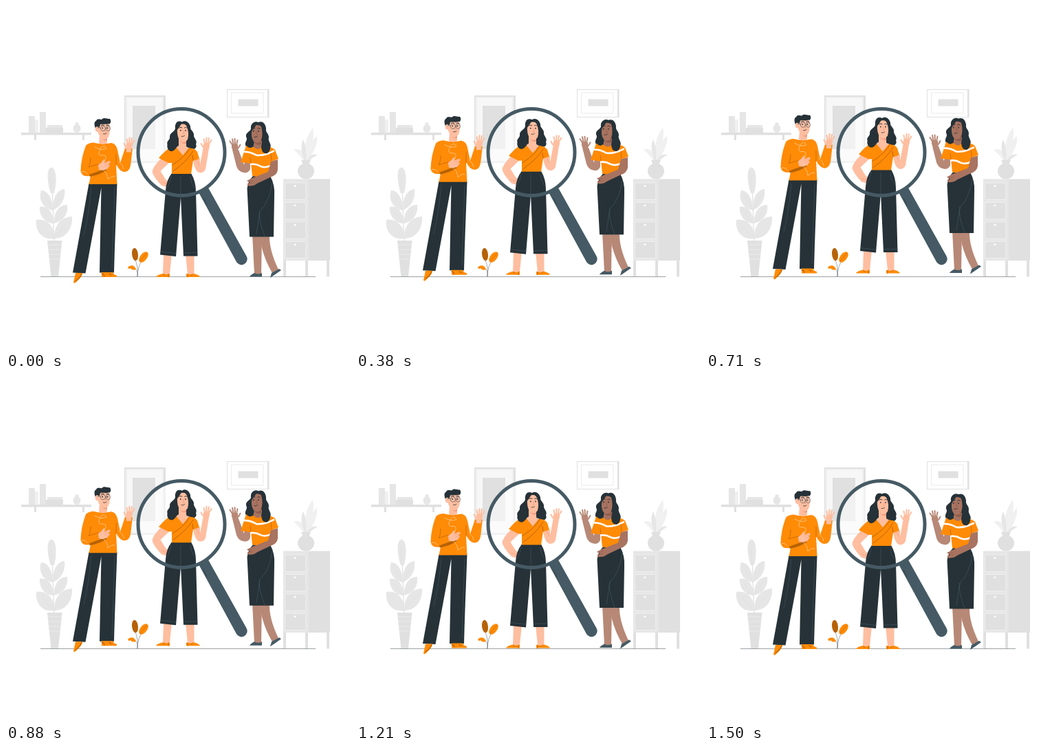
Recreate the animation shown at these times as an HTML page with a canvas. Size 500 px wide and 500 px high, loop 1540 ms.

```html
<!DOCTYPE html>
<html lang="en">
<head>
<meta charset="utf-8">
<title>Waving team</title>
<style>
  html, body { margin: 0; width: 100%; height: 100%; overflow: hidden; background: #fff; }
  canvas { display: block; width: 100vmin; height: 100vmin; }
</style>
</head>
<body>
<canvas id="stage"></canvas>
<script>
const LOOP = 1540, PEAK = 720, RISE = 5.4;
const ORANGE = '#ff8b07', RUST = '#b66206', DARK = '#263238', STEEL = '#455a64';
const PEACH = '#ffbea0', BLUSH = '#f39a7b', BROWN = '#b78876', TAN = '#a87360', UMBER = '#915e4e';
const G1 = '#f0f0f0', G2 = '#e6e6e6', G3 = '#e0e0e0';

const canvas = document.getElementById('stage');
const ctx = canvas.getContext('2d');
const scale = Math.max(1, window.devicePixelRatio || 1);
canvas.width = canvas.height = 500 * scale;

const paths = new Map();
function path(d) {
  if (!paths.has(d)) paths.set(d, new Path2D(d));
  return paths.get(d);
}
function fill(color, ...shapes) {
  ctx.fillStyle = color;
  shapes.forEach(d => ctx.fill(path(d)));
}
function line(color, width, ...shapes) {
  ctx.strokeStyle = color;
  ctx.lineWidth = width;
  shapes.forEach(d => ctx.stroke(path(d)));
}
function box(color, x, y, w, h) {
  ctx.fillStyle = color;
  ctx.fillRect(x, y, w, h);
}
function oval(color, x, y, rx, ry = rx, turn = 0) {
  ctx.fillStyle = color;
  ctx.beginPath();
  ctx.ellipse(x, y, rx, ry, turn, 0, Math.PI * 2);
  ctx.fill();
}

function drawShelf() {
  box(G3, 41, 187, 3, 8);
  box(G3, 111, 187, 3, 8);
  box(G3, 22, 184, 102, 3.5);
  box(G2, 33, 160, 9, 24);
  box(G1, 42, 165, 5, 19);
  box(G2, 49, 154, 9, 30);
  box(G2, 60, 173, 22, 5);
  box(G3, 58, 177, 25, 7);
  oval(G2, 103, 178, 5.5, 6);
  box(G2, 100.5, 169.5, 5, 5);
}

function drawPictures() {
  box(G3, 172, 130, 60, 98);
  box(G1, 173.5, 132, 55.5, 94);
  box('#f7f7f7', 176, 134, 51, 90);
  box(G3, 184, 145, 33, 63);
  box(G3, 321, 121, 61.5, 41);
  box('#fff', 322, 122, 58, 39);
  line(G2, .8, 'M328 126H374V156H328Z');
  box(G3, 337.5, 135.5, 29, 10);
}

function drawCabinet() {
  for (const x of [403, 435, 466]) box(G3, x, 368, 4, 25.5);
  box(G2, 403, 251.5, 37, 118.5);
  box(G3, 440, 251.5, 31, 118.5);
  for (let i = 0; i < 4; i++) {
    const y = 256.5 + i * 28.4;
    box(G1, 405, y, 30.5, 25.5);
    box(G3, 406, y + 1, 29, 23.5);
    oval('#fff', 420, y + 5, 1.6, 1.2);
  }
  fill(G1, 'M435 225C432 205 437 188 446 177C449 192 443 211 438 225Z',
    'M436 225C439 207 444 195 452 189C454 202 445 216 438 225Z',
    'M435 225C434 212 428 205 418 209C424 214 429 219 432 225Z');
  fill(G2, 'M434 225C429 212 428 201 432 194C436 203 437 214 436 225Z',
    'M437 225C441 217 447 214 453 216C448 219 443 222 440 226Z');
  oval(G3, 436, 240, 12, 11.5);
  fill(G3, 'M429 224H443L440 231H432Z');
}

function drawPottedPlant() {
  line(G3, 1.2, 'M67 248Q68 300 70 341');
  fill(G2, 'M66 234.500C58 236 60 258 65 272H70C74 258 74 236 66 234.500Z',
    'M68 297C53 294 47 281 51 268C61 268 68 280 68 297Z',
    'M68 297C67 280 74 267 85 266C87 280 80 292 68 297Z',
    'M69 316C56 316 48 304 49 292C61 289 69 301 69 316Z',
    'M69 316C70 299 77 289 89 289C91 303 82 314 69 316Z',
    'M70 338C53 341 42 327 44 311C60 308 71 321 70 338Z',
    'M70 338C69 320 80 306 96 306C97 324 87 338 70 338Z');
  line(G3, .6, 'M66 248V272M68 297L57 277M68 297L80 275M69 316L55 299M69 316L83 297M70 338L52 319M70 338L88 316');
  fill(G3, 'M60 341H81.500L76 393.500H65.500Z');
  line(G1, .7, 'M61 347H80M62 354H80M62.500 361H79M63 368H78');
}

function drawSprout() {
  line('#6b7378', .6, 'M191 393Q193 382 188 369M191 393Q191 378 198 370M191 393Q192 383 186 380');
  oval(RUST, 187.5, 361, 4.4, 9.3, -.12);
  oval(ORANGE, 200, 365, 5, 9, .66);
  fill(ORANGE, 'M177 380C180 376 187 376 189 383C186 384 183 384 181 381C180 383 178 382 177 380Z');
  line(RUST, .6, 'M194 372Q200 365 205 359');
}

// An open palm with four fingers and a thumb; `side` mirrors it.
function drawPalm(x, y, side, color) {
  ctx.save();
  ctx.translate(x, y);
  ctx.scale(side, 1);
  fill(color, 'M-4 1C-5 -3 -4.500 -7 -3 -8.500L4 -8.500C6 -5 5 -2 3 1L3 5H-4Z');
  line(color, 2, 'M-2 -7L-3.500 -14M0 -8L.500 -16M2.500 -8L4 -15.500M4 -7L7.500 -12.500M-3 -1Q-6.500 -4 -7.500 -7.500');
  ctx.restore();
}

function drawFace(x, y, ink, nose) {
  oval(ink, x - 3.2, y, .8, 1.1);
  oval(ink, x + 4, y, .8, 1.1);
  line(ink, .9, `M${x - 5} ${y - 4}q2 -1.500 4 0M${x + 2.500} ${y - 4}q2 -1.500 4 .500`);
  line(nose, .8, `M${x + .500} ${y}l1.500 4.500l-2 .500`);
  line(ink, .8, `M${x - 2} ${y + 8.500}q2.500 1 4.500 -1`);
}

function drawMan() {
  fill(DARK, 'M120.500 258H161.500C160 302 158 345 157 387.500H136L138.500 264L115.500 388.500L97 387.500Q109 322 120.500 258Z');
  line(STEEL, .5, 'M124 264Q121 300 113 334M158 264L154 380');
  fill(ORANGE, 'M101 388H111C111 394 104 399 100 403L98 402Z',
    'M139 387H155Q157 391 161 391.500V394H139Z');
  line(RUST, 1.2, 'M110 389Q108 395 101 400M139 389Q142 389 143 393M150 389L153 391');

  fill(ORANGE, 'M127 198.500Q140 202 153 199Q160 200 162 209L166 228L173 207H184L181 232Q179 242 171 241Q165 240 160 230L161.500 259H120.500L123 247Q110 249 108.500 240Q109 221 116 203Q119 199 127 198.500Z');
  fill(RUST, 'M121 245L143 237L147 238Q138 245 122 248Z');
  line(RUST, .7, 'M123 221Q123 230 120 234L134 230M160 216V231');
  line('#ffd5a5', .7, 'M129 205Q140 211 146 207Q143 201 138 206Q130 219 142 217Q148 218 143 226',
    'M141 238Q148 244 148 252Q155 246 158 248M110 241Q115 239 118 244M164 227Q170 231 171 237');
  fill(PEACH, 'M134 231Q139 228 142 223L144 224L143 228L150 225L152 227L149 230L151 232L147 237Q140 240 135 238Z');
  line(BLUSH, .6, 'M143 230L149 228M144 233L150 231');
  drawPalm(179, 207.5, 1, PEACH);

  fill(PEACH, 'M136 187H147V199Q142 203 135 199Z',
    'M133 171Q140 166 150 170Q152.500 182 149 190Q145 196 139 192Q133 187 133 177Z');
  fill(BLUSH, 'M139 192Q143 196 147 192V195Q143 197 139 192Z');
  fill(DARK, 'M133 183C128 176 127 168 131 167C132 163 138 165 139 165C143 161 147 165 151 164C154 168 151 173 149 171C145 173 140 171 137 172Q136 177 134 178Z');
  oval(PEACH, 132.5, 179, 2.8, 3.8);
  drawFace(143.5, 177.5, DARK, BLUSH);
  line(STEEL, .7, 'M137.500 178a3.500 3.700 0 1 0 7 0a3.500 3.700 0 1 0 -7 0M145.500 178a3 3.700 0 1 0 6 0a3 3.700 0 1 0 -6 0M137 177L133 177');
}

function drawCenterWoman() {
  fill(PEACH, 'M229 360H241L238 390H228Z', 'M261 360H273.500V390H264Z');
  fill(ORANGE, 'M228 389Q233 391 238 389V394H218Q219 391 228 389Z',
    'M262 389Q268 391 273 389Q281 391 282 394H262Z');
  line(RUST, .9, 'M229 390L231 392M236 390V394M271 390L269 392M264 390V394');

  fill(PEACH, 'M226 221L238 227L224.500 240L232 252L238 257L236 264L226 261Q214 248 212.500 241Q213 234 226 221Z',
    'M273 220L282 222L282 231L286.500 207H295L290 237Q287 244 280 242Q274 239 272 224Z');
  line(BLUSH, .7, 'M226 256L233 258M277 224L281 231');
  drawPalm(291, 207.5, 1, PEACH);
  fill(DARK, 'M241 243H269Q276 255 276 270L278.500 363.500H258L254 278L247 364L224 361.500L232 268Q233 253 241 243Z');
  line(STEEL, .6, 'M225 357L247 359.500M258 359L278 358.500M240 247Q239 256 235 263M268 248Q269 258 274 264M254 248V278');

  fill(DARK, 'M256 168.500C249 165 245 171 246 178C245 183 238 184 238 190C239 195 232 196 235 202C233 207 238 213 243 210L248 206H266C271 211 279 207 276 201C279 195 272 192 273 187C273 182 268 181 268 176C267 169 261 165 256 168.500Z');
  fill(PEACH, 'M251 193H262V204L268 208L258 222L244 207L251 203Z');
  fill(ORANGE, 'M247 205L257 217L266 206Q274 206 278 212L281 222L272 225L269 244H241V228L236 228L222 221Q232 209 240 205Z');
  line(RUST, .9, 'M267 207Q261 219 242 231M272 211Q262 227 243 240M271 217L272 224');
  fill(DARK, 'M247 180Q249 187 249 193Q252 202 246 208Q241 214 236 209Q232 202 238 194ZM266 180Q271 183 272 191Q279 200 274 206Q266 210 264 199Z');
  fill(PEACH, 'M249 177Q254 169 262 173Q267 184 264 194Q260 200 253 196Q248 190 249 177Z');
  fill(BLUSH, 'M252 196Q257 200 262 197V200Q256 201 252 196Z');
  fill(DARK, 'M256 169Q252 177 248 181L247 173ZM256 169Q263 172 266 182L268 175Q264 167 256 169Z');
  drawFace(257, 181, DARK, BLUSH);
}

function drawRightWoman() {
  fill(BROWN, 'M358 332H372L371 390H361Z', 'M369 332H383Q382 354 396 383L387 388Q377 371 372 352Z');
  fill(STEEL, 'M361 388Q366 391 372 388V393.500H354Q355 391 361 388Z',
    'M386 388L397 382L400 384L390 391L384 395Z');

  fill(DARK, 'M359 247H384Q391 260 390 275L389 335.500H354L350.500 265Q352 254 359 247Z');
  line(STEEL, .6, 'M387 257Q383 285 369 298Q366 309 376 335M369 298L364 331M360 250Q358 257 354 262');

  fill(BROWN, 'M347 222L355 226L355 237Q352 244 345 242Q338 241 335 233L329 209H338L346 231Z');
  drawPalm(333, 209, -1, BROWN);
  fill(DARK, 'M367 169C360 166 355 172 356 179C353 184 348 184 349 190C352 195 347 197 348 202C349 207 355 209 360 207L371 211C376 218 386 214 384 207C387 200 380 197 382 191C382 185 377 184 378 178C377 170 372 167 367 169Z');
  fill(TAN, 'M361 196H372V207Q366 213 359 207Z');
  fill(ORANGE, 'M349 203L360 205Q366 211 372 205Q385 203 391 209L396 222L386 226L384 246Q371 250 358 247L356 229L341 227Z');
  line('#fff', 2.6, 'M347 212Q356 212 364 217Q376 218 389 211M356 230Q363 229 370 233Q377 236 385 232');
  line(RUST, .7, 'M355 220L356 228M385 214L386 225');
  fill(TAN, 'M385 226L395 223L395 238Q394 246 384 249L365 258Q359 263 351 261L351 258L355 257L350 254L358 250L381 241Z');
  line(UMBER, .6, 'M353 258L359 257M352 255L359 254');

  fill(DARK, 'M374 182Q381 190 380 198Q388 207 380 214Q372 216 371 205ZM357 180Q361 191 358 198Q361 207 354 206Q347 204 350 196Z');
  fill(TAN, 'M358 178Q363 170 371 175Q374 186 371 195Q366 202 360 197Q355 190 358 178Z');
  fill(UMBER, 'M361 198Q366 201 371 196L371 201Q365 204 361 198Z');
  fill(DARK, 'M365 170Q362 177 357 182L356 174ZM365 170Q372 172 375 186L377 176Z');
  drawFace(363, 182, DARK, UMBER);
}

function drawLens() {
  line(STEEL, 5, 'M192 212.500a63 63 0 1 0 126 0a63 63 0 1 0 -126 0Z');
  fill(STEEL, 'M279.500 270L293 262.500L349.500 363.500A8.300 8.300 0 0 1 335 372Z');
  line(DARK, .6, 'M287 279L292 289');
}

function drawScene(ms) {
  const t = ms % LOOP;
  const lift = RISE / 2 * (1 + Math.cos((t - PEAK) / LOOP * Math.PI * 2));
  ctx.setTransform(scale, 0, 0, scale, 0, 0);
  ctx.lineCap = ctx.lineJoin = 'round';
  box('#fff', 0, 0, 500, 500);
  drawShelf();
  drawPictures();
  drawCabinet();
  drawPottedPlant();
  box('#92989b', 50, 393, 400, .9);
  drawSprout();
  oval('rgba(255,255,255,.55)', 255, 212.5, 63);
  ctx.save();
  ctx.translate(0, -lift);
  drawMan();
  drawCenterWoman();
  drawRightWoman();
  ctx.restore();
  drawLens();
}

const start = performance.now();
function tick() {
  drawScene(performance.now() - start);
  requestAnimationFrame(tick);
}
tick();
</script>
</body>
</html>
```
